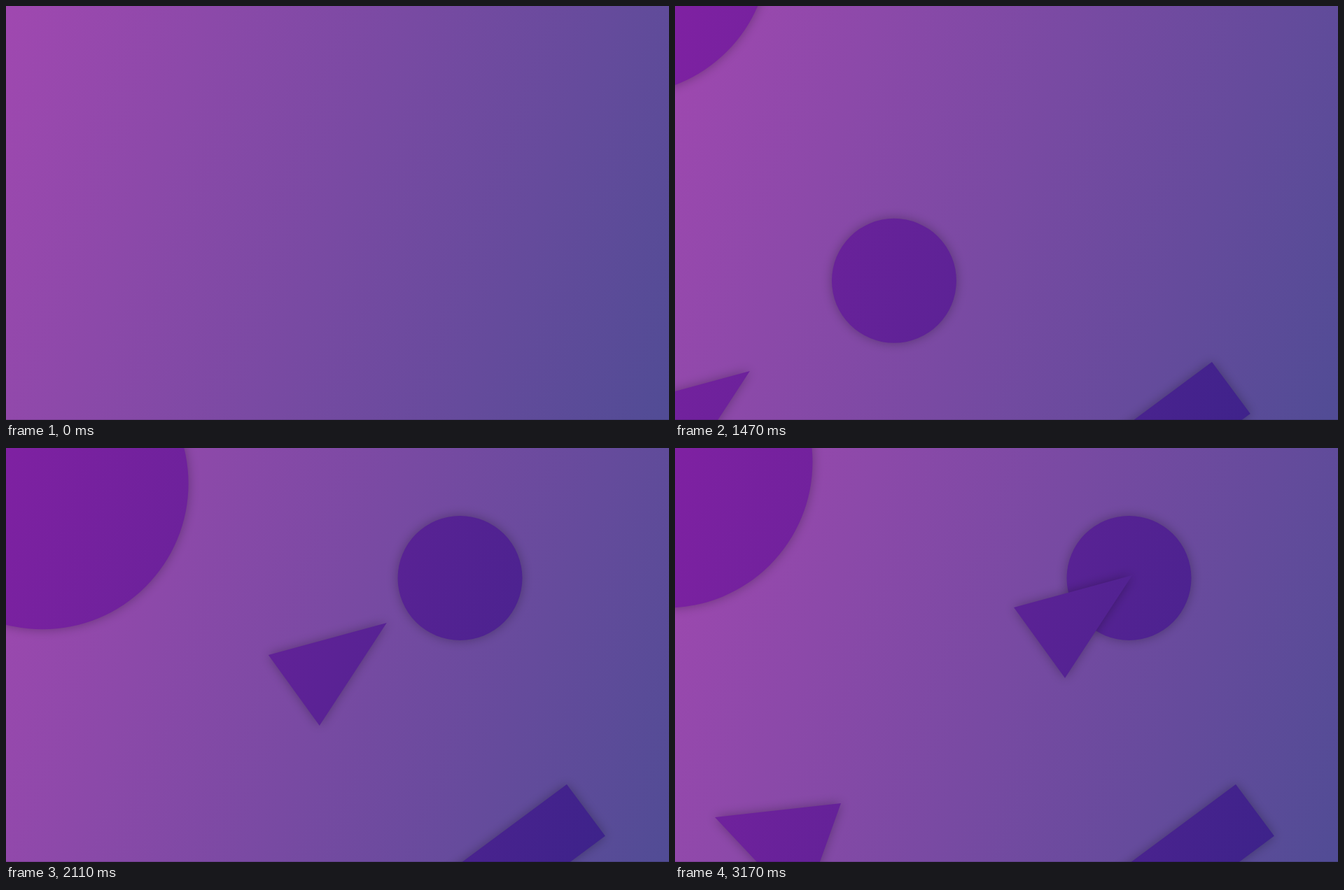
Animation of 947x592 px, one loop 3.59 s. Source, as an HTML page with a canvas:

```html
<!DOCTYPE html>
<html>
<head>
<meta charset="utf-8">
<style>
html, body { margin: 0; height: 100%; overflow: hidden; }
canvas { display: block; }
</style>
</head>
<body>
<canvas id="stage" width="947" height="592"></canvas>
<script>
const W = 947, H = 592, LOOP = 3590, START = 830, STEP = 80;
const ctx = document.getElementById('stage').getContext('2d');

// Both gradients span the stage corner to corner at 110 degrees.
function gradient(from, to) {
  const a = 20 * Math.PI / 180, c = Math.cos(a), s = Math.sin(a);
  const half = (W * c + H * s) / 2;
  const g = ctx.createLinearGradient(W / 2 - c * half, H / 2 - s * half,
                                     W / 2 + c * half, H / 2 + s * half);
  g.addColorStop(0, from);
  g.addColorStop(1, to);
  return g;
}
const back = gradient('#a048b0', '#514c95');
const front = gradient('#7f21a2', '#372388');

// The motion advances in steps, with two slower ones at the end.
function stepAt(t) {
  if (t >= 3170) return 29;
  if (t >= 3000) return 27;
  return Math.min(25, Math.floor((t - START) / STEP));
}

const move = (from, to, k) => from.map((v, i) => v + (to[i] - v) * Math.max(0, Math.min(1, k)));

function fill(path) {
  ctx.save();
  ctx.shadowColor = 'rgba(0,0,0,.3)';
  ctx.shadowBlur = 16;
  ctx.fillStyle = front;
  ctx.fill(path);
  ctx.restore();
}

// Builds a path placed at [x, y] and turned by some degrees.
function shape([x, y], angle, build) {
  const local = new Path2D(), path = new Path2D();
  build(local);
  path.addPath(local, new DOMMatrix().translate(x, y).rotate(angle));
  fill(path);
}

const disc = (at, r) => shape(at, 0, p => p.arc(0, 0, r, 0, 7));
const poly = (at, angle, points) => shape(at, angle, p => {
  points.forEach(q => p.lineTo(...q));
  p.closePath();
});

function draw(t) {
  ctx.fillStyle = back;
  ctx.fillRect(0, 0, W, H);
  const n = stepAt(t);
  if (n >= 0) {
    disc(n < 18 ? move([-199, -215], [83.5, 84], n / 18)
                : move([83.5, 84], [-12, 20], (n - 18) / 7), 208.5);
    disc(move([-45, 613.5], [648.5, 186], n / 15.5), 89);
    shape(move([676, 584], [801, 481], n / 11), -36.6, p => p.rect(-300, 0, 300, 92));
    poly(move([-330, 794], [653, 182], n / 18), 0, [[0, 0], [-169, 46], [-96, 147]]);
    if (n >= 18) {
      const k = (n - 18) / 11;
      poly(move([83.2, 660.7], [158.7, 565.8], k), -12.2 * (1 - k),
           [[78.3, -57.8], [-101.7, -37.8], [23.4, 95.6]]);
    }
  }
  ctx.fillStyle = 'rgba(0,0,0,.15)';
  ctx.fillRect(0, H - 1, W, 1);
}

const begin = performance.now();
function tick() {
  draw((performance.now() - begin) % LOOP);
  requestAnimationFrame(tick);
}
tick();
</script>
</body>
</html>
```
